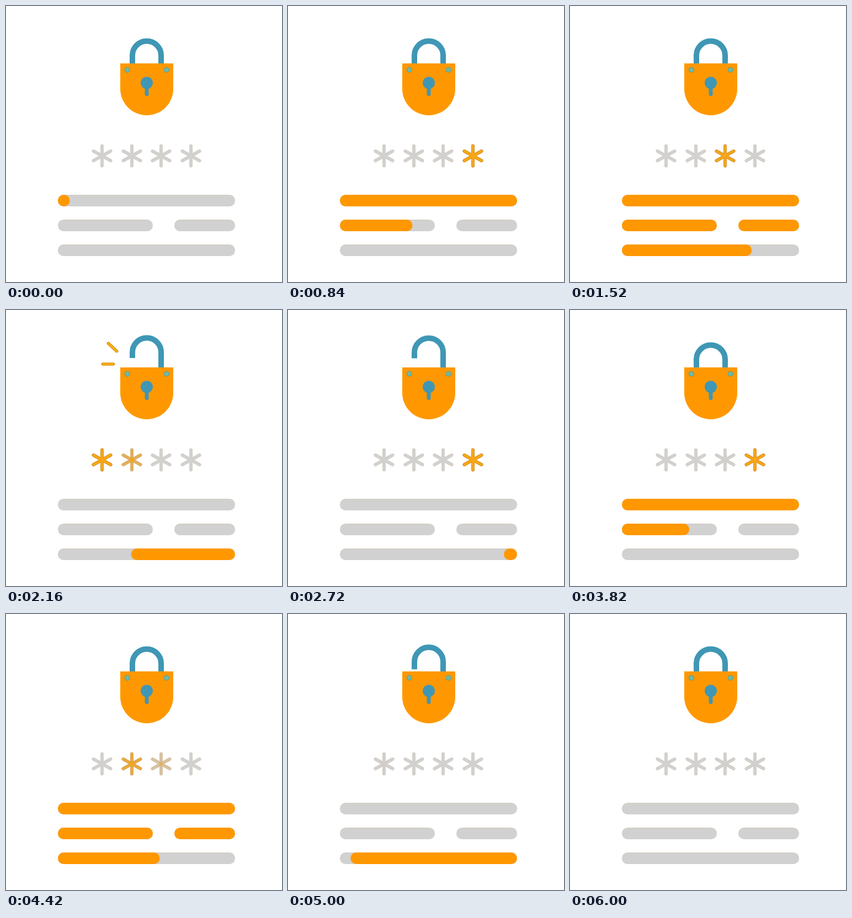
These frames come from a looping animation (500 px wide and 500 px high, 6.02 s). An HTML page with a canvas:

```html
<!DOCTYPE html>
<html lang="en">
<head>
<meta charset="utf-8">
<title>Password lock</title>
<style>
html, body { margin: 0; width: 100%; height: 100%; overflow: hidden; background: #fff; }
canvas { display: block; }
</style>
</head>
<body>
<canvas id="stage" width="500" height="500"></canvas>
<script>
const ctx = document.getElementById('stage').getContext('2d');
const LOOP = 6020, CYCLE = 3000;
const ORANGE = '#ff9800', BLUE = '#3f97b5', GREY = '#d1d1d1', EDGE = '#d4ccc1';

// Bars as [x1, x2, y]; filled and emptied one after another like a single path.
const bars = [[104.5, 404.5, 352.5], [104.5, 255.5, 397.5], [315.5, 404.5, 397.5], [104.5, 404.5, 442.5]];
const total = bars.reduce((sum, [a, b]) => sum + b - a, 0);
const fillKeys = [[0, 0], [240, 127], [840, 410], [1420, 703], [1690, total]];

const starX = [174, 228, 281, 335];
const starStart = [140, 240, 470, 690];
const WAVE = 930;

const ramp = (t, a, b) => Math.min(1, Math.max(0, (t - a) / (b - a)));
const smooth = (t, a, b) => { const p = ramp(t, a, b); return p * p * (3 - 2 * p); };
const mix = (a, b, p) => a + (b - a) * p;

function keyed(keys, t) {
  const i = keys.findIndex(k => k[0] > t);
  if (i < 0) return keys[keys.length - 1][1];
  const [t0, v0] = keys[i - 1], [t1, v1] = keys[i];
  return mix(v0, v1, ramp(t, t0, t1));
}

function stroke(color, width, cap, trace) {
  ctx.strokeStyle = color;
  ctx.lineWidth = width;
  ctx.lineCap = cap;
  ctx.beginPath();
  trace();
  ctx.stroke();
}

function line(color, width, x1, y1, x2, y2) {
  stroke(color, width, 'round', () => { ctx.moveTo(x1, y1); ctx.lineTo(x2, y2); });
}

function disc(color, x, y, r) {
  ctx.fillStyle = color;
  ctx.beginPath();
  ctx.arc(x, y, r, 0, 7);
  ctx.fill();
}

function drawLock(t) {
  const open = smooth(t, 1940, 2130) - smooth(t, 2700, 2890);
  const y = 89.5 - 13 * open;
  stroke(BLUE, 10, 'butt', () => {
    ctx.moveTo(229, 104.5 - 17.5 * open);
    ctx.lineTo(229, y);
    ctx.arc(255, y, 26, Math.PI, 0);
    ctx.lineTo(281, 105);
  });
  ctx.fillStyle = ORANGE;
  ctx.beginPath();
  ctx.moveTo(207, 104);
  ctx.lineTo(303, 104);
  ctx.lineTo(303, 150);
  ctx.arc(255, 150, 48, 0, Math.PI);
  ctx.fill();
  for (const x of [219.8, 290.8]) {
    disc('#559b8c', x, 115.7, 4.9);
    disc('#70b9a3', x, 115.7, 3.9);
  }
  disc(BLUE, 255, 139.3, 11);
  line(BLUE, 7, 255, 145, 255, 159.5);
}

function drawSparks(t) {
  const head = smooth(t, 2050, 2150), tail = smooth(t, 2230, 2340);
  if (head <= tail) return;
  for (const [x1, y1, x2, y2] of [[200.5, 74.5, 185.5, 60.5], [194.5, 98, 175.5, 98]]) {
    const at = p => [mix(x1, x2, p), mix(y1, y2, p)];
    line('#cf8a1c', 5.6, ...at(tail), ...at(head));
    line('#fbae12', 3.6, ...at(tail), ...at(head));
  }
}

function drawStar(x, color, width) {
  const y = 271.5;
  line(color, width, x, y - 18, x, y + 18);
  line(color, width, x - 15.5, y - 8.7, x + 15.5, y + 8.7);
  line(color, width, x - 15.5, y + 8.7, x + 15.5, y - 8.7);
}

function drawStars(t) {
  const wave = Math.min(2, Math.floor(t / WAVE)), w = t - wave * WAVE;
  starX.forEach((x, i) => {
    drawStar(x, EDGE, 6);
    drawStar(x, GREY, 4);
    // The last star may still be fading when the next wave begins.
    const lit = [w, wave ? w + WAVE : 0].reduce((sum, u) =>
      sum + ramp(u, starStart[i], starStart[i] + 140) - ramp(u, starStart[i] + 190, starStart[i] + 330), 0);
    if (lit <= 0) return;
    ctx.globalAlpha = lit;
    drawStar(x, '#d78f20', 6);
    drawStar(x, '#f9a815', 4);
    ctx.globalAlpha = 1;
  });
}

function drawBars(t) {
  const head = keyed(fillKeys, t);
  const tail = total * (1 - (1 - ramp(t, 1530, 2857)) ** 2.5);
  let from = 0;
  for (const [x1, x2, y] of bars) {
    const size = x2 - x1;
    line(EDGE, 21, x1, y, x2, y);
    line(GREY, 19.5, x1, y + 0.5, x2, y + 0.5);
    const a = Math.max(0, tail - from), b = Math.min(size, head - from);
    if (b > a) line(ORANGE, 21, x1 + a, y, x1 + b, y);
    from += size;
  }
}

function frame(now) {
  const time = now % LOOP;
  const t = time < 2 * CYCLE ? time % CYCLE : 0;
  ctx.fillStyle = '#fff';
  ctx.fillRect(0, 0, 500, 500);
  drawLock(t);
  drawSparks(t);
  drawStars(t);
  drawBars(t);
  requestAnimationFrame(frame);
}

const start = performance.now();
const tick = () => Math.max(0, performance.now() - start);
(function run() {
  const raf = requestAnimationFrame;
  frame.time = tick;
  raf(frame);
})();
</script>
</body>
</html>
```
